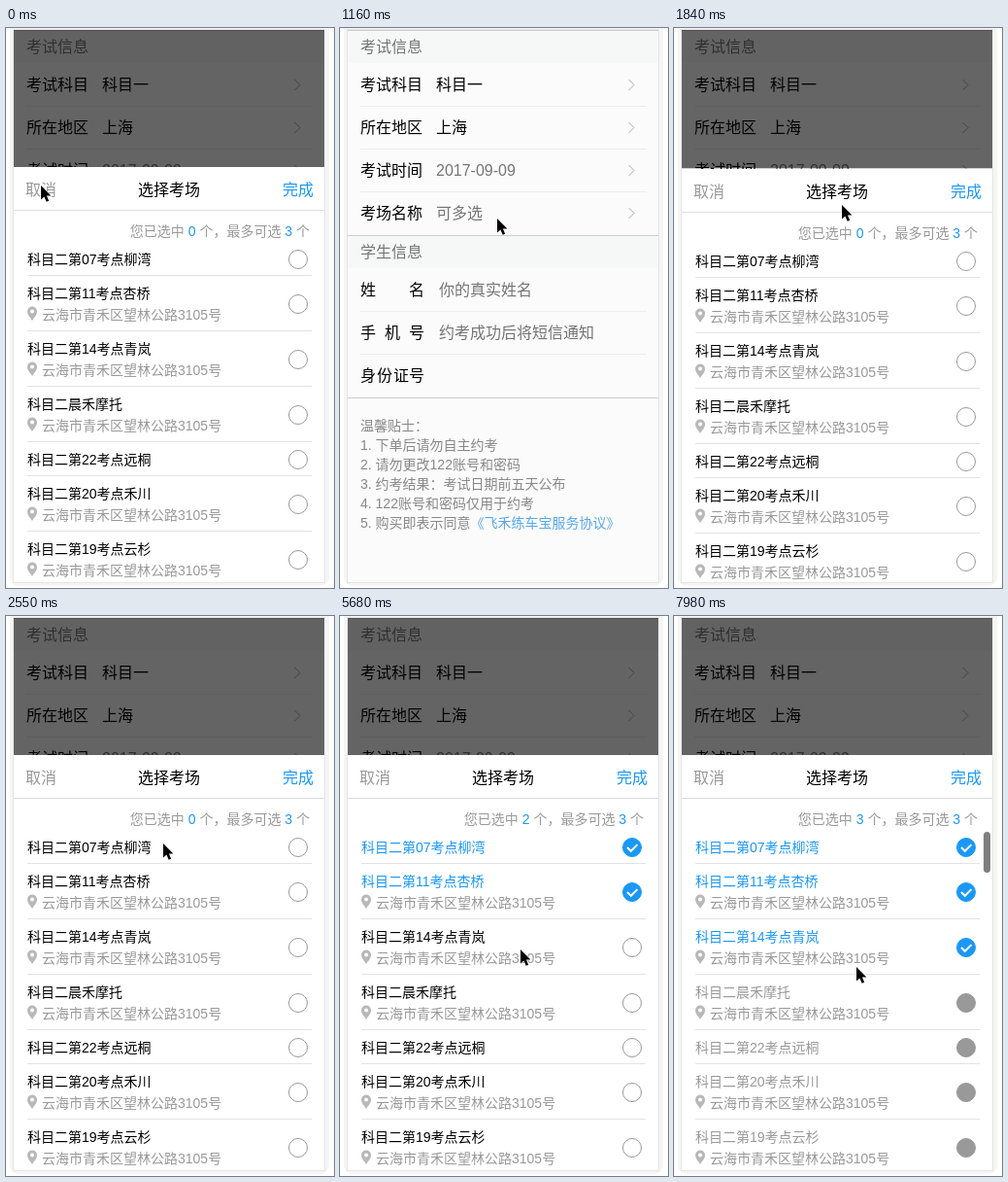
These frames come from a looping animation (338 px wide and 576 px high, 8 s). An HTML page:

```html
<!DOCTYPE html>
<html lang="zh-CN">
<head>
<meta charset="utf-8">
<title>选择考场</title>
<style>
  html, body { margin: 0; width: 100%; height: 100%; overflow: hidden; background: #fff; }
  svg { display: block; width: 338px; height: 576px; }
  text { font: 16px "Liberation Sans", "Noto Sans CJK SC", "Noto Sans CJK", sans-serif; fill: #000; white-space: pre; }
  .small { font-size: 14px; }
  .grey { fill: #999; }
  .hint { fill: #757575; }
  .tip { fill: #888; }
  .blue { fill: #1b98f5; }
  .link { fill: #58a8ea; }
  .tick, .chevron { fill: none; }
  .tick { stroke: #fff; stroke-width: 2; display: none; }
  .chevron { stroke: #aaa; }
  .pin { fill: #b8b8b8; fill-rule: evenodd; }
  .row circle { fill: #fff; stroke: #999; }
  .on .name { fill: #1b98f5; }
  .on circle { fill: #1b98f5; stroke: #1b98f5; }
  .on .tick { display: inline; }
  .off .name { fill: #999; }
  .off circle { fill: #999; }
</style>
</head>
<body>
<svg viewBox="0 0 338 576">
  <defs>
    <clipPath id="screen"><rect x="8" y="2" width="320" height="568"/></clipPath>
    <clipPath id="view"><rect x="8" y="220" width="320" height="345"/></clipPath>
  </defs>
  <rect x="4" y="-10" width="329" height="584" rx="9" fill="#f5f5f5"/>
  <rect x="7.5" y="1.5" width="321" height="569" fill="none" stroke="#e6e6e6"/>
  <g clip-path="url(#screen)">
    <g id="form"></g>
    <rect id="dim" x="8" y="2" width="320"/>
    <g id="sheet">
      <rect x="8" y="143" width="320" height="440" fill="#fff"/>
      <path id="edge" d="M8 142.5H328" stroke="#aaa"/>
      <g id="head"></g>
      <g clip-path="url(#view)"><g id="list"></g></g>
      <rect id="thumb" x="319" y="222" width="7" height="42" rx="3.5" fill="#7f7f7f"/>
    </g>
  </g>
  <path id="cursor" d="M0 0V14.5L3.4 11.4 5.7 16.8 8.2 15.7 5.9 10.5H10.4Z" stroke="#fff" stroke-width="1.1" paint-order="stroke"/>
</svg>
<script>
const LOOP = 8000, TRAVEL = 427, SLIDE = 290;
const $ = id => document.getElementById(id);

// y is the visual centre of the glyphs
const text = (x, y, str, cls = '', attrs = '') =>
  `<text x="${x}" y="${y + (cls.includes('small') ? 5 : 6)}" class="${cls}" ${attrs}>${str}</text>`;
const line = (x1, x2, y, color) => `<path d="M${x1} ${y + .5}H${x2}" stroke="${color}"/>`;

function section(top, title) {
  return `<rect x="8" y="${top}" width="320" height="34" fill="#f6f7f7"/>` +
    line(8, 328, top, '#ccc') + text(21, top + 17, title, 'hint', 'font-weight="500"');
}

function buildForm() {
  const exam = [['考试科目', '科目一', ''], ['所在地区', '上海', ''],
                ['考试时间', '2017-09-09', 'hint'], ['考场名称', '可多选', 'hint']];
  const student = [['21 71', '姓名', '你的真实姓名'], ['21 46 71', '手机号', '约考成功后将短信通知'],
                   ['21 38 55 71', '身份证号', '']];
  const tips = ['温馨贴士：', '1. 下单后请勿自主约考', '2. 请勿更改122账号和密码',
    '3. 约考结果：考试日期前五天公布', '4. 122账号和密码仅用于约考',
    '5. 购买即表示同意<tspan class="link">《飞禾练车宝服务协议》</tspan>'];
  let out = '<rect x="8" y="2" width="320" height="568" fill="#fbfbfb"/>' + section(2, '考试信息');
  exam.forEach(([label, value, cls], i) => {
    const y = 58 + 44 * i;
    out += text(21, y, label) + text(99, y, value, cls) +
      `<path class="chevron" d="M297.5 ${y - 5}l5.5 5.5-5.5 5.5"/>`;
    if (i < 3) out += line(21, 316, y + 22, '#ececec');
  });
  out += section(213, '学生信息');
  student.forEach(([xs, label, value], i) => {
    const y = 269 + 44 * i;
    out += text(xs, y, label) + text(102, y, value, 'hint');
    if (i < 2) out += line(21, 316, y + 22, '#ececec');
  });
  out += line(8, 328, 380, '#ccc');
  tips.forEach((tip, i) => out += text(21, 409 + 20 * i, tip, 'small tip'));
  return out;
}

function buildHead() {
  return text(20, 166, '取消', 'grey') + text(136, 166, '选择考场') + text(285, 166, '完成', 'blue') +
    line(8, 328, 187, '#dcdcdc') +
    text(313, 209, '您已选中 <tspan id="count" class="blue">0</tspan> 个，最多可选 <tspan class="blue">3</tspan> 个',
      'small grey', 'text-anchor="end"');
}

function buildList() {
  const names = ['第07考点柳湾', '第11考点杏桥', '第14考点青岚', '晨禾摩托', '第22考点远桐',
                 '第20考点禾川', '第19考点云杉', '第16考点竹溪', '第18考点麦园', '第21考点荷塘'];
  let top = 220;
  return names.map((name, i) => {
    const short = i === 0 || i === 4;
    const height = short ? 35 : 57, cy = top + (short ? 18 : 29);
    const address = short ? '' : text(37, top + 40, '云海市青禾区望林公路3105号', 'small grey') +
      `<path class="pin" d="M27 ${top + 46}c-1.5-3-5-5.500-5-9.500a5 5 0 0 1 10 0c0 4-3.500 6.500-5 9.500zm-2-9.500a2 2 0 0 0 4 0a2 2 0 0 0-4 0z"/>`;
    const row = `<g class="row">${text(22, top + 18, '科目二' + name, 'small name')}${address}
      <circle cx="301" cy="${cy}" r="9.5"/><path class="tick" d="M296 ${cy}l3.800 3.800 6.700-6.700"/>
      ${line(22, 315, top + height - 1, '#e3e3e3')}</g>`;
    top += height;
    return row;
  }).join('');
}

$('form').innerHTML = buildForm();
$('head').innerHTML = buildHead();
$('list').innerHTML = buildList();
const rows = [...document.querySelectorAll('.row')];

// time, x, y of the pointer tip
const pointer = [[0, 36, 162], [825, 36, 162], [940, 72, 205], [1030, 112, 220], [1130, 155, 203],
  [1220, 174, 184], [1750, 174, 184], [1840, 173, 182], [1920, 165, 178], [2040, 165, 178],
  [2550, 162, 234], [2870, 162, 234], [3250, 171, 278], [3820, 171, 278], [3850, 174, 273],
  [3910, 178, 266], [4140, 184, 318], [4970, 184, 318], [5120, 186, 285], [5540, 186, 285],
  [5680, 186, 343], [7400, 186, 343], [7440, 186, 348], [7830, 186, 348], [7980, 188, 361]];
const scroll = [[6790, 0], [7080, 110], [7440, 24], [7600, 24], [7680, 0]];
// the sheet is repainted only at these moments
const repaints = [0, 290, 380, 470, 520, 1610, 1660, 1750, 1840, 1920];

function track(keys, t) {
  const i = keys.findIndex(k => k[0] > t);
  if (i < 0) return keys[keys.length - 1].slice(1);
  if (i === 0) return keys[0].slice(1);
  const a = keys[i - 1], b = keys[i], p = (t - a[0]) / (b[0] - a[0]);
  return a.slice(1).map((v, n) => v + (b[n + 1] - v) * p);
}

// CSS "ease": cubic-bezier(.25, .1, .25, 1)
function ease(x) {
  if (x <= 0 || x >= 1) return x <= 0 ? 0 : 1;
  let lo = 0, hi = 1, s;
  for (let i = 0; i < 20; i++) {
    s = (lo + hi) / 2;
    if (.75 * s * (1 - s) + s ** 3 < x) lo = s; else hi = s;
  }
  return .3 * s * (1 - s) ** 2 + 3 * (1 - s) * s * s + s ** 3;
}

function drawSheet(t) {
  const at = repaints.filter(r => r <= t).pop();
  const closing = at < 1000;
  const shown = closing ? (at ? 1 - ease((at - 201) / SLIDE) : 1) : ease((at - 1576) / SLIDE);
  const offset = Math.round(TRAVEL * (1 - shown));
  $('sheet').setAttribute('transform', `translate(0 ${offset})`);
  $('sheet').style.display = shown > 0 ? '' : 'none';
  $('edge').style.display = closing && offset ? '' : 'none';
  // while opening, the shade lags behind the sheet edge
  $('dim').setAttribute('height', 141 + offset * (closing ? 1 : .64));
  $('dim').setAttribute('opacity', .6 * (closing ? shown ** 2 : shown));
}

function drawList(t) {
  const picked = [t >= 2850, t >= 3520 && t < 4430 || t >= 5390, t >= 6100];
  const count = picked.filter(Boolean).length;
  $('count').textContent = count;
  rows.forEach((row, i) => row.setAttribute('class', 'row' + (picked[i] ? ' on' : count === 3 ? ' off' : '')));
  const [y] = track(scroll, t);
  $('list').setAttribute('transform', `translate(0 ${-Math.round(y)})`);
  $('thumb').setAttribute('y', 222 + y * .12);
  $('thumb').style.display = t >= 6820 ? '' : 'none';
}

function frame() {
  const t = performance.now() % LOOP;
  drawSheet(t);
  drawList(t);
  $('cursor').setAttribute('transform', `translate(${track(pointer, t).map(Math.round)})`);
  requestAnimationFrame(frame);
}
frame();
</script>
</body>
</html>
```
